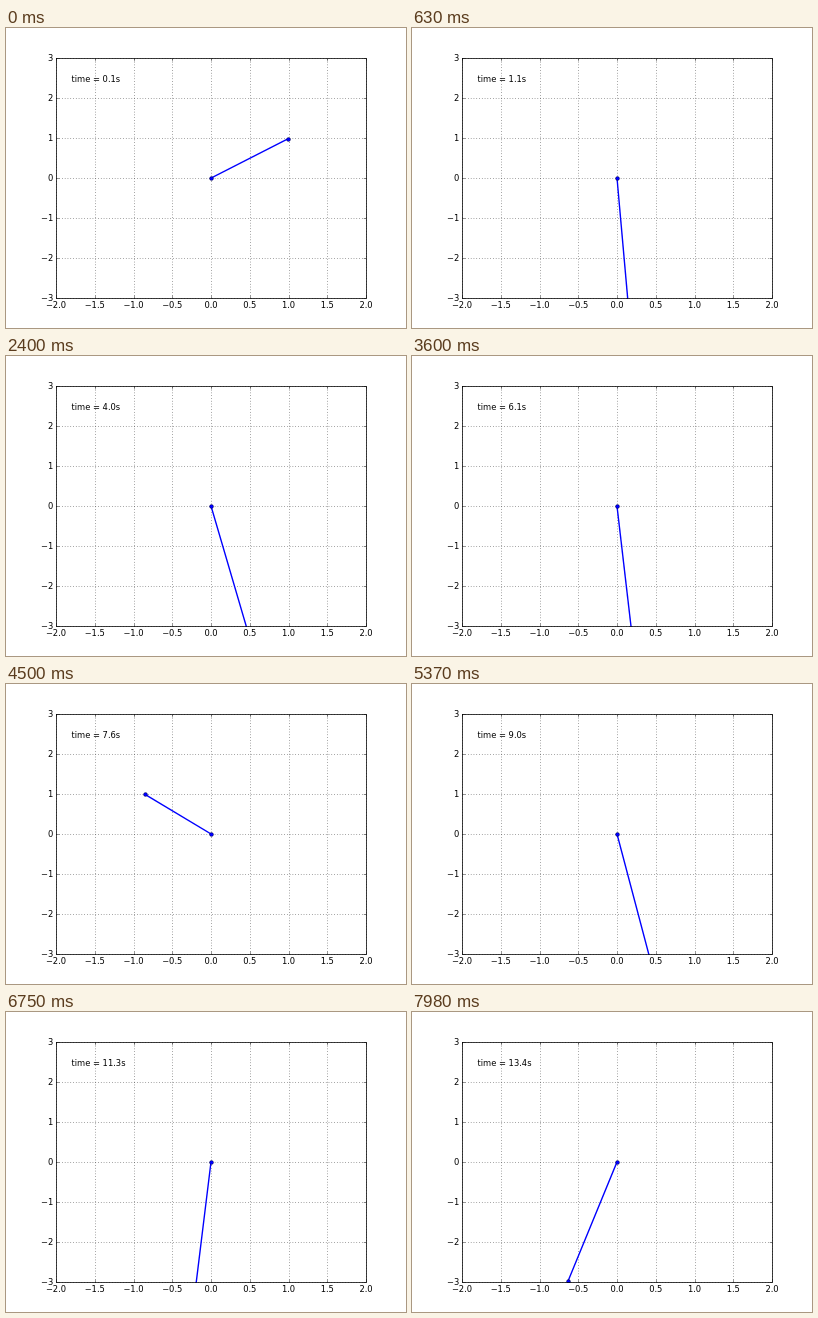
Animation of 400x300 px, one loop 8 s. Source, as an HTML page:

```html
<!DOCTYPE html>
<html lang="en">
<head>
<meta charset="utf-8">
<title>Elastic pendulum</title>
<style>
  html, body { margin: 0; width: 100%; height: 100%; overflow: hidden; background: #fff; }
  svg { display: block; width: 400px; height: 300px; }
  text { font: 8.333px "DejaVu Sans", sans-serif; fill: #000; }
  .grid { stroke: #000; stroke-width: .5; stroke-dasharray: .694 2.083; }
  .tick { stroke: #000; stroke-width: .4; }
  .rod { stroke: #00f; stroke-width: 1.389; stroke-linecap: square; }
  .dot { fill: #00f; stroke: #000; stroke-width: .347; }
  .frame { fill: none; stroke: #000; stroke-width: .75; }
</style>
</head>
<body>
<svg viewBox="0 0 400 300">
  <clipPath id="plot"><rect x="50" y="30" width="311" height="241"/></clipPath>
  <g id="gridLines"></g>
  <g clip-path="url(#plot)">
    <line id="rod" class="rod" x1="205" y1="150"/>
    <circle class="dot" cx="205.5" cy="150.5" r="2"/>
    <circle id="bob" class="dot" r="2"/>
  </g>
  <g id="axes"><rect class="frame" x="50.5" y="30.5" width="310" height="240"/></g>
  <text id="clock" x="65.5" y="54"></text>
</svg>
<script>
const LOOP = 8000, STEP_MS = 30, STEPS = 267;
const DT = 0.05, SUBSTEPS = 50;
const GRAVITY = 9.8, STIFFNESS = 10, REST_LENGTH = 1;

const $ = id => document.getElementById(id);
const toX = x => 205 + 77.5 * x;
const toY = y => 150 - 40 * y;
const snap = v => Math.round(v) + 0.5;

function add(parent, tag, attrs, text = "") {
  const node = document.createElementNS("http://www.w3.org/2000/svg", tag);
  for (const key in attrs) node.setAttribute(key, attrs[key]);
  node.textContent = text;
  parent.append(node);
}

function addLine(parent, cls, x1, y1, x2, y2) {
  add(parent, "line", { class: cls, x1, y1, x2, y2 });
}

const label = (value, digits) => value.toFixed(digits).replace("-", "\u2212");

function drawAxes() {
  const grid = $("gridLines"), axes = $("axes"), tick = 2.78;
  for (let v = -2; v <= 2; v += 0.5) {
    const x = snap(toX(v));
    addLine(grid, "grid", x, 270.5, x, 30.5);
    addLine(axes, "tick", x, 270.5, x, 270.5 - tick);
    addLine(axes, "tick", x, 30.5, x, 30.5 + tick);
    add(axes, "text", { x: toX(v), y: 280, "text-anchor": "middle" }, label(v, 1));
  }
  for (let v = -3; v <= 3; v++) {
    const y = snap(toY(v));
    addLine(grid, "grid", 50.5, y, 360.5, y);
    addLine(axes, "tick", 50.5, y, 50.5 + tick, y);
    addLine(axes, "tick", 360.5, y, 360.5 - tick, y);
    add(axes, "text", { x: 47.2, y: toY(v) + 3, "text-anchor": "end" }, label(v, 0));
  }
}

// State is [x, y, vx, vy] for a unit mass on a spring.
function slope([x, y, vx, vy]) {
  const pull = STIFFNESS * (1 - REST_LENGTH / Math.hypot(x, y));
  return [vx, vy, -pull * x, -pull * y - GRAVITY];
}

function rungeKutta(s, h) {
  const shift = (k, f) => s.map((v, i) => v + f * k[i]);
  const a = slope(s);
  const b = slope(shift(a, h / 2));
  const c = slope(shift(b, h / 2));
  const d = slope(shift(c, h));
  return s.map((v, i) => v + h / 6 * (a[i] + 2 * b[i] + 2 * c[i] + d[i]));
}

function solve() {
  const path = [];
  let state = [1, 1, 0, 0];
  for (let i = 0; i < STEPS; i++) {
    for (let j = 0; j < SUBSTEPS; j++) state = rungeKutta(state, DT / SUBSTEPS);
    path.push([toX(state[0]), toY(state[1])]);
  }
  return path;
}

const path = solve();

function render(ms) {
  const i = Math.min(STEPS - 1, Math.floor(ms % LOOP / STEP_MS));
  const [x, y] = path[i];
  $("rod").setAttribute("x2", x);
  $("rod").setAttribute("y2", y);
  $("bob").setAttribute("cx", snap(x));
  $("bob").setAttribute("cy", snap(y));
  $("clock").textContent = `time = ${((i + 1) * DT).toFixed(1)}s`;
}

drawAxes();
render(0);
const start = performance.now();
function tick() {
  render(Math.max(0, performance.now() - start));
  requestAnimationFrame(tick);
}
requestAnimationFrame(tick);
</script>
</body>
</html>
```
